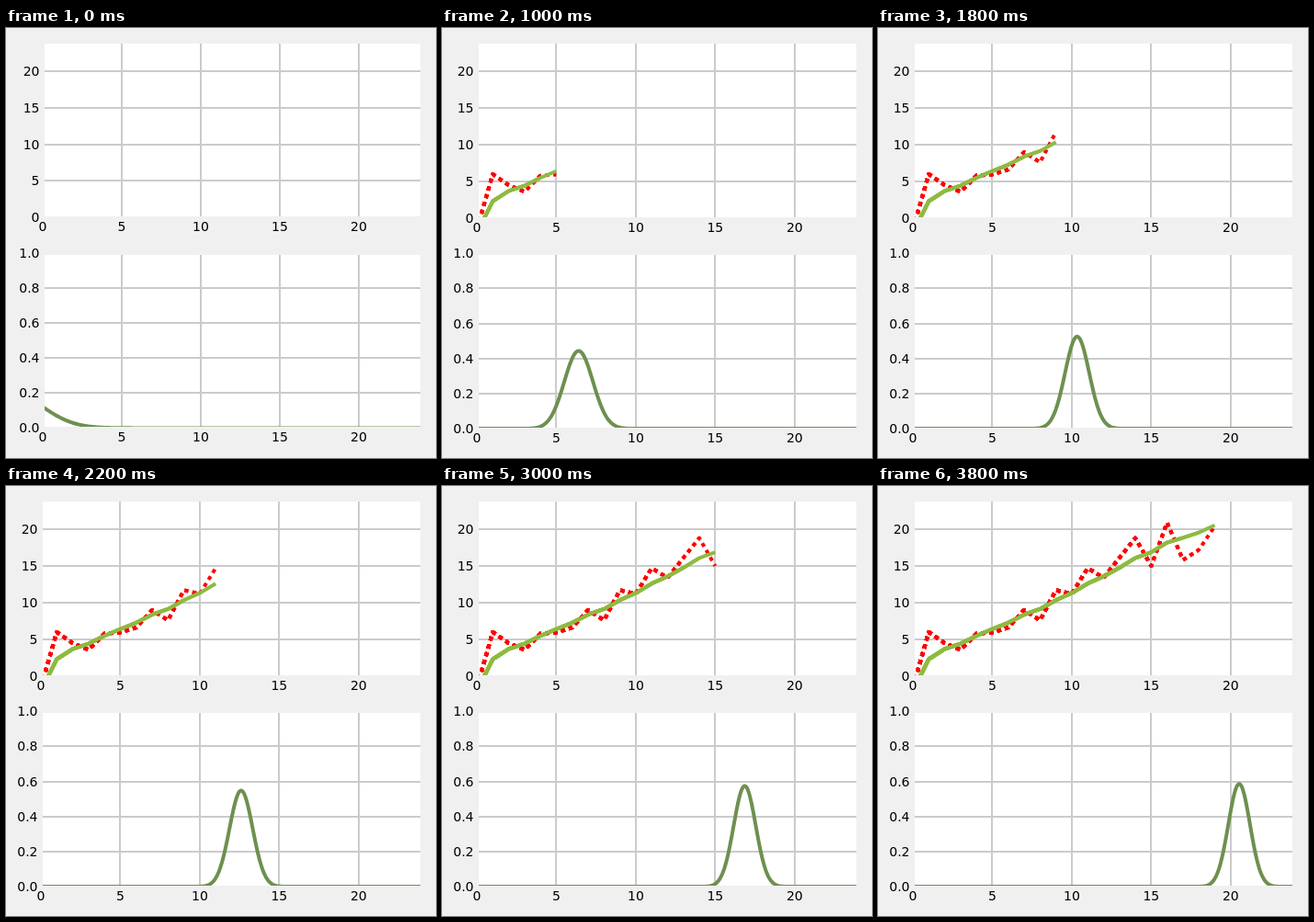
An HTML page with a canvas that plays this animation: 468x468 px, repeating every 4 s.

```html
<!DOCTYPE html>
<html>
<head>
<meta charset="utf-8">
<style>
html, body { margin: 0; height: 100%; overflow: hidden; background: #f0f0f0; }
canvas { display: block; }
</style>
</head>
<body>
<canvas id="stage" width="468" height="468"></canvas>
<script>
const ctx = document.getElementById('stage').getContext('2d');
const STEPS = 20, STEP_MS = 200, SPAN = 24;

// Noisy measurements, filtered by a 1D Kalman filter with motion 1 per step
const measured = [-1.5, 6, 4.5, 3.6, 5.8, 5.95, 6.6, 9, 7.6, 11.7,
  11.2, 14.7, 13.4, 16.1, 18.8, 15, 20.9, 15.8, 17.2, 20.4];
const MOTION_VAR = 0.05, SENSOR_VAR = 4.5;
const means = [-2], vars = [4];
for (let i = 1; i < STEPS; i++) {
  const v = vars[i - 1] + MOTION_VAR, m = means[i - 1] + 1;
  const gain = v / (v + SENSOR_VAR);
  means.push(m + gain * (measured[i] - m));
  vars.push(v * (1 - gain));
}

const firstLayout = { left: 40, dx: 17.2, charts: [
  { y0: 206, dy: 39.75 / 5, max: 24, tick: 5, digits: 0 },
  { y0: 435.4, dy: 190.2, max: 1, tick: 0.2, digits: 1 }] };
const layout = { left: 38, dx: 17.29, charts: [
  { y0: 207, dy: 8, max: 24, tick: 5, digits: 0 },
  { y0: 436.1, dy: 191, max: 1, tick: 0.2, digits: 1 }] };

function polyline(points, color, dash = []) {
  ctx.beginPath();
  points.forEach(p => ctx.lineTo(...p));
  ctx.strokeStyle = color;
  ctx.lineWidth = 4;
  ctx.lineJoin = 'round';
  ctx.setLineDash(dash);
  ctx.stroke();
}

function drawChart(lay, chart, plot) {
  const x = v => lay.left + v * lay.dx;
  const y = v => chart.y0 - v * chart.dy;
  const l = Math.floor(lay.left), r = Math.floor(x(SPAN));
  const t = Math.floor(y(chart.max)), b = Math.floor(chart.y0);
  const rows = Math.floor(chart.max / chart.tick + 0.01);

  ctx.save();
  ctx.beginPath();
  ctx.rect(l + 2, t + 2, r - l - 3, b - t - 3);
  ctx.clip();
  ctx.fillStyle = '#fff';
  ctx.fillRect(l, t, r - l, b - t);
  ctx.fillStyle = '#cbcbcb';
  for (let v = 5; v < SPAN; v += 5) ctx.fillRect(Math.round(x(v)) - 1, t, 2, b - t);
  for (let i = 1; i <= rows; i++) ctx.fillRect(l, Math.round(y(i * chart.tick)) - 1, r - l, 2);
  plot(x, y);
  ctx.restore();

  ctx.fillStyle = '#000';
  ctx.font = '14px "DejaVu Sans", sans-serif';
  ctx.textAlign = 'center';
  for (let v = 0; v < SPAN; v += 5) ctx.fillText(v, x(v), b + 15);
  ctx.textAlign = 'right';
  for (let i = 0; i <= rows; i++) {
    const v = i * chart.tick;
    ctx.fillText(v.toFixed(chart.digits), lay.left - 3.5, Math.round(y(v)) + 5);
  }
}

function draw(step) {
  const lay = step ? layout : firstLayout;
  ctx.fillStyle = '#f0f0f0';
  ctx.fillRect(0, 0, 468, 468);

  // Each step adds its lines over the earlier ones, which hardens their edges
  drawChart(lay, lay.charts[0], (x, y) => {
    const path = (data, n) => data.slice(0, n + 1).map((v, i) => [x(i), y(v)]);
    for (let n = 1; n <= step; n++) {
      polyline(path(measured, n), '#f00', [4.4, 4.4]);
      polyline(path(means, n), '#8eba42');
    }
  });

  drawChart(lay, lay.charts[1], (x, y) => {
    const points = [];
    for (let v = 0; v <= SPAN; v += 0.05) {
      const d = v - means[step];
      const p = Math.exp(-d * d / (2 * vars[step])) / Math.sqrt(2 * Math.PI * vars[step]);
      points.push([x(v), y(p)]);
    }
    polyline(points, '#6d904f');
  });
}

const start = performance.now();
let shown = -1;
function tick() {
  const step = Math.floor((performance.now() - start) / STEP_MS) % STEPS;
  if (step !== shown) draw(shown = step);
  requestAnimationFrame(tick);
}
tick();
</script>
</body>
</html>
```
